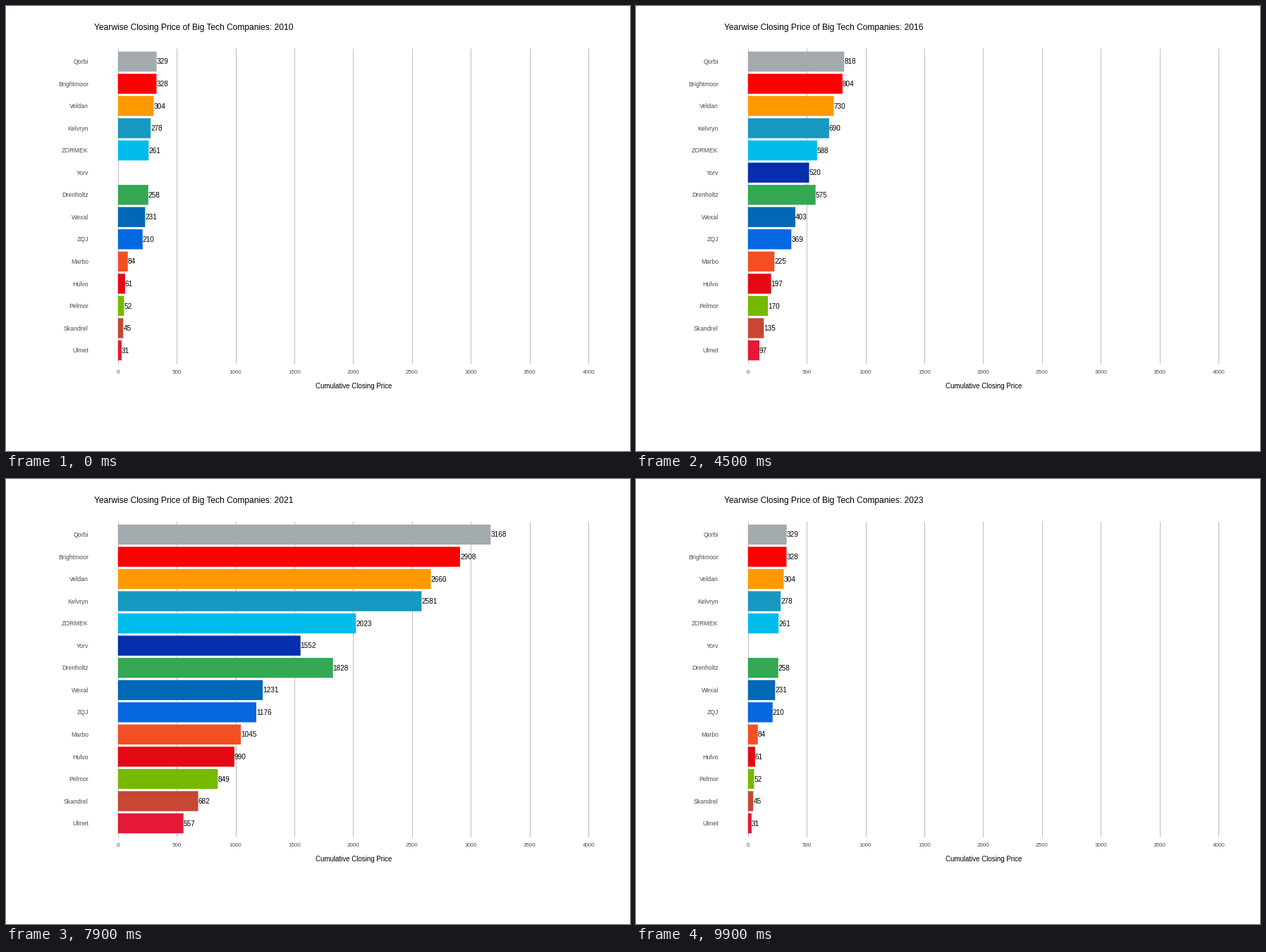
These frames come from a looping animation (885 by 632 pixels, 10000 ms). A matplotlib script:

```python
import matplotlib.pyplot as plt
import numpy as np
from matplotlib.animation import FuncAnimation
from matplotlib.patches import Rectangle

plt.rcParams["font.family"] = "Liberation Sans"

W, H, DPI = 885, 632, 100
X0, X_SCALE = 158.75, 0.16685       # pixel of value 0, pixels per unit
TOP, BOTTOM = 60, 508               # vertical span of the panel
STEP = (BOTTOM - TOP) / 14.2        # distance between rows
BAR_H = 0.9 * STEP
CAP = 0.716                         # cap height relative to font size
FIRST_YEAR, LAST_YEAR = 2010, 2023
G = np.nan                          # gap: interpolated, or 0 before the first price

# Mean closing price per year, 2010 to 2022, in stacking order.
FIRMS = [
    ("Ulmet", "#E31937", [31, G, 33, 44, 67, G, 97, 140, 235, 277, 416, 557, 396]),
    ("Skandrel", "#C74634", [14, G, 16, G, 29, 31, 38, G, 56, 60, 74, 125, 115]),
    ("Pelmor", "#76B900", [7, G, 11, G, 16, G, 35, 48, 82, 90, 134, 167, 126]),
    ("Hulvo", "#E50914", [9, 13, 21, 17, 24, 30, 27, G, 47, 52, 95, 141, 155]),
    ("Marbo", "#F25022", [23, 17, 19, G, 24, G, 28, 33, 45, 52, 43, 55, 49]),
    ("ZQJ", "#0668E1", [126, 163, 192, G, 174, 148, 144, 153, 137, 134, 119, 131, 134]),
    ("Wexal", "#0068B5", [21, G, 25, 23, 30, G, 34, 37, 49, G, 55, 55, 38]),
    ("Yorv", "#052FAD", [G, G, 26, 36, 69, 89, 117, 157, 172, 182, 235, 321, 180]),
    ("Drenholtz", "#34A853", [27, G, 30, G, 43, G, 55, 72, 101, 130, 193, 276, 269]),
    ("ZORMEK", "#00BCEB", [3, G, 3, G, 4, 6, 13, G, 58, 44, 99, 195, 186]),
    ("Kelvryn", "#1798C1", [17, 27, 12, 35, 58, 92, 102, 165, 319, 329, 447, 558, 285]),
    ("Veldan", "#FF9900", [26, G, 30, G, 40, G, 40, G, 48, 54, 55, 79, 76]),
    ("Brightmoor", "#FF0000", [24, G, 37, G, 57, 70, 74, 91, 132, 155, 201, 248, 177]),
    ("Qorbi", "#A2AAAD", [1, G, 2, G, 15, G, 14, G, 22, 18, 96, 260, 263]),
]
ROWS = [0, 1, 2, 3, 4, 5, 6, 8, 7, 9, 10, 11, 12, 13]   # bottom to top
LAST_PRICE = {"ZQJ": 142}           # the only firm with prices in the last year

# Frames at which the bars jump to the next year; the title follows one later.
JUMPS = [7, 15, 23, 30, 37, 44, 50, 57, 64, 71, 78, 85, 92, 99]


def fill_gaps(prices):
    p = np.array(prices, float)
    years = np.arange(len(p))
    known = ~np.isnan(p)
    return np.interp(years, years[known], p[known], left=0)


def running_totals():
    """Totals by year and firm; 0 where a firm has no price."""
    prices = np.array([np.append(fill_gaps(p), LAST_PRICE.get(name, 0))
                       for name, _, p in FIRMS]).T
    return np.where(prices > 0, prices.cumsum(axis=1), 0)


TOTALS = running_totals()

fig = plt.figure(figsize=(W / DPI, H / DPI), dpi=DPI, facecolor="white")
ax = fig.add_axes([0, 0, 1, 1])
ax.set_xlim(0, W)
ax.set_ylim(H, 0)
ax.axis("off")


def text(x, y, s, px, color="black", ha="left"):
    return ax.text(x, y, s, fontsize=px * 72 / DPI, color=color,
                   ha=ha, va="baseline", zorder=3)


for value in range(0, 4001, 500):
    x = X0 + X_SCALE * value
    ax.plot([x, x], [TOP, BOTTOM], color="#BEBEBE", lw=72 / DPI,
            solid_capstyle="butt", zorder=1)
    text(x, 522, str(value), 8, "#4D4D4D", "center")

title = text(125, 34, "", 12)
text(492.7, 543, "Cumulative Closing Price", 9.8, ha="center")

bars, labels = [], []
for (name, color, _), row in zip(FIRMS, ROWS):
    y = BOTTOM - (row + 0.6) * STEP
    text(116.8, y + CAP * 8.8 / 2, name, 8.8, "#4D4D4D", "right")
    bar = Rectangle((X0, y - BAR_H / 2), 0, BAR_H, fc=color, ec="none",
                    snap=False, zorder=2)
    bars.append(ax.add_patch(bar))
    labels.append(text(X0, y + CAP * 9.96 / 2, "", 9.96))


def draw(frame):
    shown = sum(frame >= j for j in JUMPS) % len(TOTALS)
    year = FIRST_YEAR + sum(frame > j for j in JUMPS)
    title.set_text(f"Yearwise Closing Price of Big Tech Companies: {min(year, LAST_YEAR)}")
    for bar, label, total in zip(bars, labels, TOTALS[shown]):
        width = X_SCALE * total
        bar.set_width(width)
        bar.set_visible(total > 0)
        label.set_x(X0 + width)
        label.set_text(f"{total:.0f}" if total > 0 else "")
    return [title, *bars, *labels]


anim = FuncAnimation(fig, draw, frames=100, interval=100, repeat=True,
                     repeat_delay=0, blit=False)
plt.show()
```
